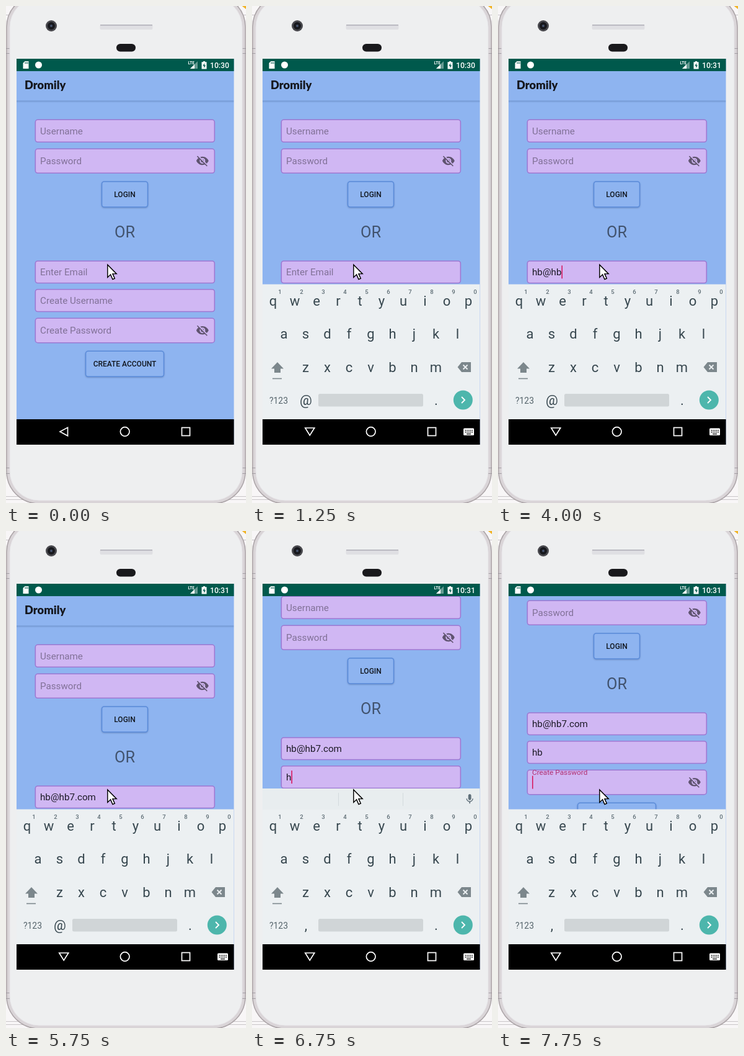
These frames come from a looping animation (387x801 px, 8 s). An HTML page:

```html
<!DOCTYPE html>
<html lang="en">
<head>
<meta charset="utf-8">
<title>Sign-up form on a phone</title>
<style>
  html, body { margin: 0; height: 100%; overflow: hidden; background: #f8f6f7; }
  svg { display: block; width: 387px; height: 801px; }
  text { font-family: Roboto, sans-serif; white-space: pre; }
  .hint { font-size: 15.2px; fill: #817197; }
  .typed { font-size: 15.2px; fill: #1c1a26; }
  .field rect { fill: #d0b7f3; stroke: #9d78d2; stroke-width: 1.6; }
  .button rect { fill: #8eb4f0; stroke: #5a8bd9; stroke-width: 1.6; }
  .button text { font-size: 12px; font-weight: 500; text-anchor: middle; fill: #12171f; }
  .key { font-size: 22px; text-anchor: middle; fill: #37474f; }
  .digit { font-size: 9.5px; font-weight: 500; text-anchor: middle; fill: #5d6c74; }
  .word { font-size: 15px; text-anchor: middle; fill: #37474f; }
</style>
</head>
<body>
<svg viewBox="0 0 387 801">
  <defs>
    <clipPath id="screen"><rect x="17" y="85" width="350.5" height="622"/></clipPath>
    <clipPath id="page"><rect x="17" y="105" width="350.5" height="561"/></clipPath>
    <linearGradient id="shade" x2="0" y2="1">
      <stop stop-color="#5377ad" stop-opacity=".5"/><stop offset="1" stop-color="#5377ad" stop-opacity="0"/>
    </linearGradient>
    <filter id="drop" x="-10%" y="-20%" width="120%" height="150%">
      <feDropShadow dx="0" dy="1" stdDeviation="1" flood-color="#34507f" flood-opacity=".4"/>
    </filter>
    <path id="eye" d="M12 7c2.76 0 5 2.24 5 5 0 .65-.13 1.26-.36 1.83l2.92 2.92c1.51-1.26 2.7-2.89 3.43-4.75-1.73-4.39-6-7.5-11-7.5-1.4 0-2.74.25-3.98.7l2.16 2.16C10.74 7.13 11.35 7 12 7zM2 4.27l2.74 2.74C3.08 8.3 1.78 10.02 1 12c1.73 4.39 6 7.5 11 7.5 1.55 0 3.03-.3 4.38-.84L19.73 22 21 20.73 3.27 3zM7.53 9.8l1.55 1.55c-.05.21-.08.43-.08.65 0 1.66 1.34 3 3 3 .22 0 .44-.03.65-.08l1.55 1.55c-.67.33-1.41.53-2.2.53-2.76 0-5-2.24-5-5 0-.79.2-1.53.53-2.2zm4.31-.78l3.15 3.15.02-.16c0-1.66-1.34-3-3-3z"/>
  </defs>

  <!-- Phone body -->
  <path d="M0 14.5H387M0 790.5H387M0 795.5H387M368.5 0V14" stroke="#c9c5c8"/>
  <path d="M380.5 0H387V5Z" fill="#f0b429"/>
  <rect x="1" y="-18" width="385" height="820" rx="52" fill="#d9d4d7" stroke="#aaa3a6" stroke-width="1.5"/>
  <path d="M0 68.500h6M0 76.500h6M381 68.500h6M381 76.500h6M0 744.500h6M0 753.500h6M381 744.500h6M381 753.500h6" stroke="#a19ca2"/>
  <rect x="6" y="-13" width="375" height="810" rx="47" fill="#eeeff0" stroke="#e3e0e4"/>
  <circle cx="73" cy="32" r="9" fill="#47474c"/>
  <circle cx="73" cy="32" r="6" fill="#17181d"/>
  <circle cx="73" cy="32" r="2" fill="#45526c"/>
  <rect x="151.5" y="30" width="85" height="8" rx="2" fill="#dfdfe3"/>
  <path d="M152 30.700H236" stroke="#aeadb6" stroke-width="1.500"/>
  <rect x="178" y="61" width="31" height="12.5" rx="6.2" fill="#19191c"/>

  <!-- App -->
  <rect x="17" y="85" width="350.5" height="622" fill="#8eb4f0"/>
  <g clip-path="url(#page)">
    <g id="content">
      <rect x="17" y="152.5" width="350.5" height="3.5" fill="url(#shade)"/>
      <text x="30" y="134" font-size="18.3" font-weight="900" fill="#15171d" style="font-family:Lato,sans-serif">Dromily</text>
      <text x="191.5" y="373" font-size="25.3" text-anchor="middle" fill="#41536e">OR</text>
    </g>
  </g>
  <rect x="17" y="666" width="350.5" height="41"/>

  <g clip-path="url(#screen)">
    <g id="keyboard">
      <rect x="17" y="448.5" width="350.5" height="217.5" fill="#ecf0f2"/>
      <g id="strip">
        <rect x="17" y="415" width="350.5" height="34" fill="#e8edef"/>
        <path d="M139.5 422V443M243.5 422V443" stroke="#d3dadd"/>
        <path transform="translate(341.5 422.5) scale(.8)" fill="#60707a" d="M12 14c1.66 0 3-1.34 3-3V5c0-1.66-1.34-3-3-3S9 3.34 9 5v6c0 1.66 1.34 3 3 3zm5.3-3c0 3-2.54 5.1-5.3 5.1S6.7 14 6.7 11H5c0 3.41 2.72 6.23 6 6.72V21h2v-3.28c3.28-.48 6-3.3 6-6.72z"/>
        <g id="words" class="word"><text x="78" y="437">he</text><text x="191.5" y="437">hb</text><text x="294" y="437">be</text></g>
      </g>
      <path d="M41 574L51 584.5H46V591H36V584.5H31Z" fill="#7c878c"/>
      <path d="M33 600.5H48" stroke="#7c878c" stroke-width="1.6"/>
      <path d="M338 574H353V590H338L331.5 582Z" fill="#7c878c"/>
      <path d="M340.5 578.5L347.5 585.5M347.5 578.5L340.5 585.5" stroke="#ecf0f2" stroke-width="1.8"/>
      <text x="43" y="640.6" font-size="13.9" text-anchor="middle" fill="#55646b">?123</text>
      <rect x="107" y="625" width="169" height="20.5" rx="2.5" fill="#d0d5d7"/>
      <circle cx="340.3" cy="635" r="15.5" fill="#4db6ac"/>
      <path d="M338 630L343 635L338 640" fill="none" stroke="#fff" stroke-width="1.8"/>
    </g>
  </g>

  <!-- Navigation and status bars -->
  <g fill="none" stroke="#fff" stroke-width="1.7">
    <path id="back"/>
    <circle cx="191.7" cy="686" r="7.3"/>
    <rect x="283.5" y="679.5" width="13" height="13"/>
  </g>
  <g id="switcher">
    <rect x="341" y="680.5" width="17" height="11.5" rx="1.5" fill="#fff"/>
    <path d="M343.5 684H356M343.5 686.8H356" stroke="#000" stroke-width="1.5" stroke-dasharray="1.5 1.2"/>
    <path d="M346 689.8H353" stroke="#000" stroke-width="1.3"/>
  </g>
  <rect x="17" y="85" width="350.5" height="20" fill="#00594c"/>
  <g fill="#fff">
    <path d="M30.5 89H36.5V101H27.5V92Z"/>
    <path d="M31 90.5V93M33 90.5V93M35 90.5V93" stroke="#00594c"/>
    <circle cx="52.5" cy="95" r="5.5"/>
    <text x="293.5" y="94" font-size="6.3" font-weight="700">LTE</text>
    <path d="M309 89V101H297Z" opacity=".4"/>
    <path d="M304 94V101H297Z"/>
    <path d="M318 89H321V90.3H323.5V101.5H315.5V90.3H318Z"/>
    <path d="M320.3 92L317.3 96.5H319.3V100L322 95.5H320Z" fill="#00594c"/>
    <text id="clock" x="329" y="99.5" font-size="12.2" font-weight="500"></text>
  </g>
  <path transform="translate(163.8 417) scale(1.2)" d="M0 0V17L4 13.2L6.8 19.6L9.6 18.4L6.8 12.2H12Z" fill="#fff" stroke="#000" stroke-width="1.2"/>
</svg>
<script>
const $ = id => document.getElementById(id);

function add(parent, tag, attrs = {}, text = '') {
  const node = document.createElementNS('http://www.w3.org/2000/svg', tag);
  for (const name in attrs) node.setAttribute(name, attrs[name]);
  node.textContent = text;
  parent.append(node);
  return node;
}

function addField(hint, y, height, secret) {
  const group = add($('content'), 'g', { class: 'field' });
  add(group, 'rect', { x: 47.3, y, width: 289, height, rx: 4 });
  const middle = y + height / 2;
  const label = add(group, 'text', { class: 'hint', x: 55, y: middle + 5.4 }, hint);
  const value = add(group, 'text', { class: 'typed', x: 55, y: middle + 5.4 });
  if (secret) add(group, 'use', { href: '#eye', fill: '#605470', transform: `translate(306 ${middle - 11}) scale(.9)` });
  return { label, value, y, middle };
}

function addButton(caption, x, y, width) {
  const group = add($('content'), 'g', { class: 'button' });
  add(group, 'rect', { x, y, width, height: 41, rx: 4, filter: 'url(#drop)' });
  add(group, 'text', { x: x + width / 2, y: y + 25 }, caption);
}

const fields = {
  login: addField('Username', 183.3, 36),
  secret: addField('Password', 230.3, 39, true),
  email: addField('Enter Email', 411, 35.5),
  user: addField('Create Username', 456.7, 35.8),
  pass: addField('Create Password', 503.3, 39.4, true)
};
addButton('LOGIN', 154.5, 283, 74);
addButton('CREATE ACCOUNT', 128.5, 556.3, 126);
const caret = add($('content'), 'rect', { width: 1.6, height: 21, fill: '#d81b60' });

const keyRow = (letters, x, y) => [...letters].forEach((letter, i) =>
  add($('keyboard'), 'text', { class: 'key', x: x + 35 * i, y }, letter));
keyRow('qwertyuiop', 34, 483);
keyRow('asdfghjkl', 51.5, 536);
keyRow('zxcvbnm', 86.5, 589.5);
keyRow('.', 297, 643);
[...'1234567890'].forEach((digit, i) =>
  add($('keyboard'), 'text', { class: 'digit', x: 45 + 35 * i, y: 464 }, digit));
const symbol = add($('keyboard'), 'text', { class: 'key', x: 87, y: 643 });

// Each track lists [start ms, value]; values hold until the next entry.
const tracks = {
  clock: [[0, '10:30'], [2000, '10:31']],
  email: [[0, ''], [2750, 'hb'], [3500, 'hb@'], [4000, 'hb@hb'], [4250, 'hb@hb7'], [5000, 'hb@hb7.'], [5250, 'hb@hb7.com']],
  user: [[0, ''], [6750, 'h'], [7000, 'hb']],
  caret: [[0, ''], [250, 'login'], [750, 'email'], [1250, ''], [1750, 'email'], [2250, ''], [2750, 'email'],
    [3250, ''], [3500, 'email'], [4750, ''], [5000, 'email'], [5750, ''], [6000, 'user'], [6500, ''],
    [6750, 'user'], [7500, ''], [7750, 'pass']],
  scroll: [[0, 0], [6000, 62], [6250, 78], [7750, 118]],
  rise: [[0, 0], [1000, .45], [1250, 1]],
  strip: [[0, false], [6000, true], [7750, false]],
  words: [[0, false], [7000, true], [7250, false]],
  symbol: [[0, '@'], [6000, ',']],
  floating: [[0, false], [7750, true]]
};
const valueAt = (track, t) => track.findLast(([start]) => start <= t)[1];
const show = (node, visible) => node.setAttribute('visibility', visible ? 'inherit' : 'hidden');

function draw(t) {
  const now = {};
  for (const name in tracks) now[name] = valueAt(tracks[name], t);

  $('clock').textContent = now.clock;
  $('content').setAttribute('transform', `translate(0 ${-now.scroll})`);
  for (const name of ['email', 'user']) {
    fields[name].value.textContent = now[name];
    show(fields[name].label, !now[name]);
  }

  const { label, y, middle } = fields.pass;
  label.setAttribute('y', now.floating ? y + 8 : middle + 5.4);
  label.style.fontSize = now.floating ? '11.8px' : '';
  label.style.fill = now.floating ? '#b12f72' : '';

  show(caret, now.caret);
  if (now.caret) {
    const field = fields[now.caret];
    caret.setAttribute('x', 55 + (now[now.caret] ? field.value.getComputedTextLength() : 0));
    caret.setAttribute('y', field.middle - 10.5);
  }

  const open = now.rise > 0;
  show($('keyboard'), open);
  $('keyboard').setAttribute('opacity', now.rise);
  $('keyboard').setAttribute('transform', `translate(0 ${now.rise < 1 ? 60 : 0})`);
  symbol.textContent = now.symbol;
  show($('strip'), open && now.strip);
  show($('words'), now.words);
  show($('switcher'), open);
  $('back').setAttribute('d', open ? 'M85.8 680H100.7L93.2 692Z' : 'M99.5 679.3V692.8L87 686Z');
}

function tick() {
  draw(performance.now() % 8000);
  requestAnimationFrame(tick);
}
tick();
</script>
</body>
</html>
```
